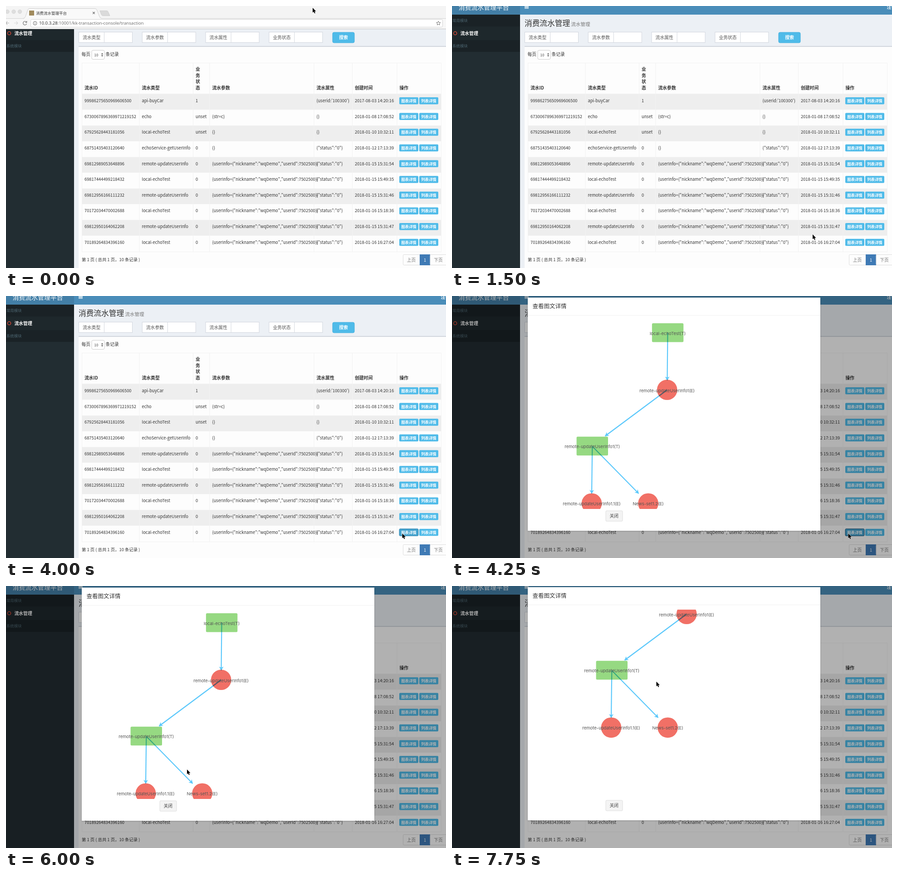
Write an HTML page that moves like this. It is 970 by 577 pixels and loops after 8000 ms.

```html
<!DOCTYPE html>
<html lang="zh-CN">
<head>
<meta charset="utf-8">
<title>消费流水管理平台</title>
<style>
html, body { margin: 0; width: 100%; height: 100%; overflow: hidden; background: #ecf0f5; }
svg { display: block; width: 970px; height: 577px; }
text { font-family: "Noto Sans CJK SC", "Noto Sans CJK", sans-serif; white-space: pre; }
.url { font-family: "Open Sans", "Noto Sans", sans-serif; }
.label { font-family: Inter, Roboto, sans-serif; }
.node { mix-blend-mode: multiply; }
#modal { isolation: isolate; }
</style>
</head>
<body>
<svg id="stage" viewBox="0 0 970 577" xmlns="http://www.w3.org/2000/svg"></svg>
<script>
const BLUE = '#4fbbe9', INK = '#333', LINE = '#d2d6de';
const stage = document.getElementById('stage');

const rect = (x, y, w, h, fill, more = '') =>
  `<rect x="${x}" y="${y}" width="${w}" height="${h}" fill="${fill}" ${more}/>`;
const frame = (x, y, w, h, fill, stroke, rx = 0) =>
  rect(x + .5, y + .5, w - 1, h - 1, fill, `stroke="${stroke}" rx="${rx}"`);
const text = (x, y, str, size = 9.8, fill = INK, more = '') =>
  `<text x="${x}" y="${y}" font-size="${size}" fill="${fill}" ${more}>${str}</text>`;
const path = (d, stroke, width = 1, more = '') =>
  `<path d="${d}" fill="none" stroke="${stroke}" stroke-width="${width}" ${more}/>`;
const BOLD = 'font-weight="700"', MID = 'text-anchor="middle"';

function sidebar() {
  return rect(0, 0, 150, 577, '#222d32')
    + rect(0, 0, 150, 19, '#437fa7')
    + text(14.5, 7.5, '消费流水管理平台', 13.9, '#f4f8fb')
    + rect(0, 19, 150, 26, '#1a2226') + text(1, 35, '常用模块', 8.4, '#4b646f')
    + rect(0, 45, 150, 30, '#1e282c')
    + '<circle cx="7" cy="60" r="3.6" fill="none" stroke="#dd4b39" stroke-width="1.4"/>'
    + text(18.5, 63.5, '流水管理', 9.8, '#fff', BOLD)
    + rect(0, 75, 150, 26, '#1a2226') + text(1, 91, '系统模块', 8.4, '#4b646f');
}

function filters() {
  const names = ['流水类型', '流水参数', '流水属性', '业务状态'];
  return names.map((name, i) => {
    const x = 160 + i * 139.8;
    return frame(x, 57, 119, 24, '#fff', LINE)
      + rect(x + 56, 57, 1, 24, LINE) + text(x + 9, 73, name, 9.8, '#555');
  }).join('')
    + frame(719.5, 57.5, 49, 24, BLUE, '#46b0de', 3)
    + text(744, 73, '搜索', 9.8, '#fff', BOLD + MID.padStart(20));
}

const info = '{userInfo={"nickname":"wqDemo","userId":7502500}}';
const zero = '{"status":"0"}';
const local = 'local-echoTest', remote = 'remote-updateUserInfo';
const rows = [
  ['99986275650969606500', 'api-buyCar', '1', '', "{userid:'100300'}", '2017-08-03 14:20:16'],
  ['6730067896369971219152', 'echo', 'unset', '{str=c}', '{}', '2018-01-08 17:08:52'],
  ['67925628443181056', local, 'unset', '{}', '{}', '2018-01-10 10:32:11'],
  ['68751435403120640', 'echoService-getUserInfo', '0', '{}', zero, '2018-01-12 17:13:39'],
  ['69812989053648896', remote, '0', info, zero, '2018-01-15 15:31:54'],
  ['69817444499218432', local, '0', info, zero, '2018-01-15 15:49:35'],
  ['69812956166111232', remote, '0', info, zero, '2018-01-15 15:31:46'],
  ['70172034470002688', local, '0', info, zero, '2018-01-16 15:18:36'],
  ['69812950164062208', remote, '0', info, zero, '2018-01-15 15:31:47'],
  ['70189264834396160', local, '0', info, zero, '2018-01-16 16:27:04']
];
const cols = [167, 293.5, 412, 448.5, 678.5, 763, 861.5];

function button(x, y, label, id = '') {
  return rect(x, y, 42, 15.5, BLUE, `rx="2" ${id}`)
    + text(x + 21, y + 11, label, 8.4, '#fff', BOLD + ' ' + MID);
}

function table() {
  const heads = ['流水ID', '流水类型', '', '流水参数', '流水属性', '创建时间', '操作'];
  let out = rect(167, 125, 793, 417, '#fdfdfd');
  rows.forEach((row, i) => {
    const y = 194 + i * 34.65;
    out += rect(167, y, 792, 34.65, i % 2 ? '#fdfdfd' : '#eeeeee');
  });
  cols.concat(959).forEach(x => out += rect(x, 125, 1, 417, '#f2f2f2'));
  [125, 193, 541].forEach(y => out += rect(167, y, 793, 1, '#f2f2f2'));
  heads.forEach((h, i) => out += text(cols[i] + 6, 184, h, 9.8, INK, BOLD));
  [...'业务状态'].forEach((c, i) => out += text(418, 142.6 + i * 13.9, c, 9.8, INK, BOLD));
  rows.forEach((row, i) => {
    const y = 208.4 + i * 34.65;
    row.forEach((cell, c) => out += text(cols[c] + 6, y + 3.5, cell, 9.33));
    out += button(867, y - 7.5, '图表详情', i === 9 ? 'id="detail"' : '')
      + button(911, y - 7.5, '列表详情');
  });
  return out;
}

function page() {
  return rect(0, 0, 970, 577, '#ecf0f5')
    + rect(150, 0, 820, 19, '#4a8db9')
    + [0, 2.2, 4.4].map(y => rect(160, y, 9, 1.3, '#fff')).join('')
    + text(958.5, 6, '注销', 9.8, '#fff', BOLD)
    + sidebar()
    + text(160, 44, '消费流水管理', 16.7, INK, 'font-weight="500"')
    + text(262.5, 44, '流水管理', 10.5, '#777')
    + filters()
    + rect(160, 88, 810, 2.2, LINE) + rect(160, 90, 810, 487, '#fdfdfd')
    + text(166.5, 109.5, '每页') + frame(188.5, 97, 29, 21, '#fff', '#ccc', 3)
    + text(194.5, 111, '10', 8, '#444') + text(219.5, 109.5, '条记录')
    + '<path d="M210 106.5l2-3 2 3zM210 108.5l2 3 2-3z" fill="#444"/>'
    + table()
    + text(167, 562, '第 1 页 ( 总共 1 页，10 条记录 )', 9.4)
    + frame(875, 547, 38, 24, '#fdfdfd', '#ddd', 2) + text(893.5, 562.8, '上页', 9.8, '#777', MID)
    + rect(912, 547, 23, 24, '#3f7ab5') + text(923.5, 562.8, '1', 9.4, '#fff', MID)
    + frame(934.5, 547, 38, 24, '#fdfdfd', '#ddd', 2) + text(953, 562.8, '下页', 9.8, '#777', MID);
}

function browser() {
  return `<g id="browser">`
    + rect(0, 0, 970, 28, '#f4f4f4') + rect(0, 27, 970, 24, '#f7f7f7') + rect(0, 50, 970, 1, '#c4c4c4')
    + [3, 17, 30.5].map(x => `<circle cx="${x}" cy="12.5" r="4.2" fill="#dedede" stroke="#d2d2d2" stroke-width=".7"/>`).join('')
    + path('M0 27.5H40', '#d4d4d4') + path('M211 27.5H970', '#d4d4d4')
    + '<path d="M38 27.5Q41.500 27 43 23L48 8.500Q49.200 5.500 52 5.500H196Q199 5.500 200.300 8.500L206 23Q207.500 27 211 27.500" fill="#f9f9f9" stroke="#cfcfcf"/>'
    + rect(51, 10, 11, 11, '#a08a5c') + text(66, 18.6, '消费流水管理平台', 8.5, '#333')
    + path('M191.200 13l4.600 4.600M195.800 13l-4.600 4.600', '#666', 1.1)
    + '<path d="M207 10.500H222Q224 10.500 225 12.500L229 21.500H214Q211.500 21.500 210.500 19.500Z" fill="#dadada" stroke="#cbcbcb" stroke-width=".8"/>'
    + path('M0 37.500H7M3 34l-3.500 3.500 3.500 3.500', '#b0b0b0', 1.2)
    + path('M18 37.500H26M22.500 34l3.500 3.500-3.500 3.500', '#d8d8d8', 1.2)
    + path('M45 35.500A4 4 0 1 0 45.500 39M45.800 33V36.200H42.500', '#777', 1.2)
    + frame(54, 29, 909, 18, '#fff', '#d3d3d3', 3)
    + '<circle cx="64" cy="38" r="4" fill="none" stroke="#666"/>' + path('M64 37.300V40.200M64 35.600V36.500', '#666')
    + `<text class="url" x="73" y="41.300" font-size="9.67" fill="#666"><tspan fill="#222">10.0.3.28</tspan>:10001/kk-transaction-console/transaction</text>`
    + path('M953.300 33.300l1.300 3 3.200.300-2.400 2.100.700 3.200-2.800-1.700-2.800 1.700.700-3.200-2.400-2.100 3.200-.300z', '#666', .9)
    + '</g>';
}

// Edge with a barbed head, from (x, y) to the tip (u, v)
function edge(x, y, u, v) {
  const turn = Math.atan2(v - y, u - x) * 180 / Math.PI;
  return path(`M${x} ${y}L${u} ${v}`, '#5bc8fb', 2.2)
    + `<path d="M0.500 0L-8 -5L-5.500 0L-8 5Z" fill="#5bc8fb" transform="translate(${u} ${v}) rotate(${turn})"/>`;
}
const box = (x, y) => rect(x - 34.7, y - 20.8, 69.4, 41.6, '#96d982', 'rx="2.5" class="node"');
const ball = (x, y) => `<circle cx="${x}" cy="${y}" r="22.4" fill="#f17066" class="node"/>`;
const label = (x, y, s) => text(x, y + 4.6, s, 9.5, '#555', `class="label" ${MID}`);

function graph() {
  return edge(475.5, 80, 474.5, 184.5) + edge(474, 206, 337.5, 307.5)
    + edge(309.3, 330, 308, 434) + edge(309.3, 330, 411.5, 434)
    + box(475.6, 79.7) + ball(474.2, 205.7) + box(309.3, 329.5) + ball(308, 455.8) + ball(432.6, 455.8)
    + label(475.6, 80, 'local-echoTest(T)') + label(474.2, 206.3, 'remote-updateUserInfo1(E)')
    + label(309.3, 329.8, 'remote-updateUserInfo1(T)')
    + label(308, 455.8, 'remote-updateUserInfo1.1(E)') + label(432.6, 455.8, 'News-set1.2(E)');
}

function dialog() {
  return `<g id="shade">${rect(0, 0, 970, 577, '#000', 'opacity=".3"')}<g id="modal">`
    + rect(167, 2.5, 645, 513.5, '#fff', 'style="filter:drop-shadow(0 1.500px 1.500px rgba(0,0,0,.2))"')
    + text(177.5, 26, '查看图文详情', 12.5, INK, 'font-weight="500"')
    + rect(167, 41, 645, 1, '#f1f1f1')
    + `<g clip-path="url(#view)"><g id="graph">${graph()}</g></g>`
    + frame(338.5, 471.5, 38, 24, '#f4f4f4', '#ddd', 2) + text(357.3, 487, '关闭', 9.8, '#444', MID)
    + '</g></g>';
}

stage.innerHTML = `<defs><clipPath id="view">${rect(177, 52, 625, 416, '#fff')}</clipPath></defs>`
  + page() + dialog() + browser()
  + '<path id="cursor" d="M0 0V10.600L2.400 8.400L4.100 12.200L5.900 11.400L4.300 7.700H7.500Z" fill="#000" stroke="#fff" stroke-width=".9" paint-order="stroke"/>';

// Steps: [start ms, values...]
const pointer = [
  [0, 676, 4], [250, 674, 35], [500, 670, 39], [750, 473, 99], [1000, 474, 113],
  [1250, 542.5, 221.5], [1500, 795, 503], [2000, 865, 510.5], [2250, 872, 522],
  [2500, 873.5, 523], [4500, 866.5, 519], [4750, 627, 445.5], [5250, 587, 433],
  [5500, 403, 393], [5750, 399, 404], [6750, 407.5, 354.5], [7750, 450.5, 210.5]
];
const lift = [[0, 1], [4500, 2], [5750, 1], [6500, 0]];
const pan = [[0, 0, 0], [7750, 43, -144]];
const press = [[0, BLUE, 'none'], [3750, '#3ba9d9', '#3596c2'], [4000, '#43a3cf', '#3888b0'],
  [4250, '#43a3cf', '#23567a'], [4500, BLUE, 'none']];

const at = (steps, t) => steps.filter(s => s[0] <= t).pop().slice(1);
const el = id => document.getElementById(id);
const parts = Object.fromEntries(['cursor', 'browser', 'shade', 'modal', 'graph', 'detail'].map(id => [id, el(id)]));
const move = (node, x, y) => node.setAttribute('transform', `translate(${x} ${y})`);

const start = performance.now();
function draw(now) {
  const t = Math.max(0, now - start) % 8000;
  move(parts.cursor, ...at(pointer, t));
  move(parts.modal, 0, ...at(lift, t));
  move(parts.graph, ...at(pan, t));
  parts.browser.style.display = t < 1000 ? '' : 'none';
  parts.shade.style.display = t < 4250 ? 'none' : '';
  const [fill, stroke] = at(press, t);
  parts.detail.setAttribute('fill', fill);
  parts.detail.setAttribute('stroke', stroke);
  requestAnimationFrame(draw);
}
draw(start);
</script>
</body>
</html>
```
